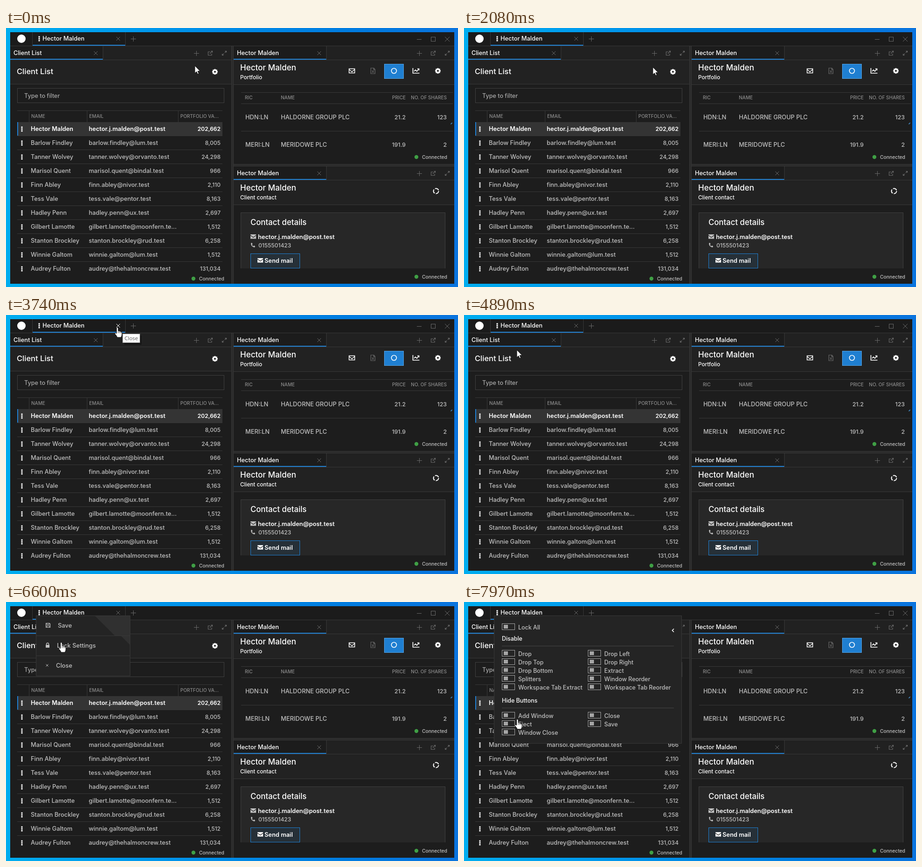
These frames come from a looping animation (967x556 px, 8000 ms). An HTML page with a canvas:

```html
<!DOCTYPE html>
<html lang="en">
<head>
<meta charset="utf-8">
<title>Client workspace</title>
<style>
html, body { margin: 0; width: 100%; height: 100%; overflow: hidden; background: #1d1d1d; }
canvas { display: block; }
</style>
</head>
<body>
<canvas id="stage" width="967" height="556"></canvas>
<script>
const g = document.getElementById('stage').getContext('2d');
const LOOP = 8000, STEP = 70;
const BLUE = '#1f7fd1', LINE = '#383838', DIM = '#686868', GREY = '#c0c0c0', WHITE = '#fff';
const CLIENT = 'Hector Malden', EMAIL = 'hector.j.malden@post.test';

const rows = [
  [CLIENT, EMAIL, '202,662'],
  ['Barlow Findley', 'barlow.findley@lum.test', '8,005'],
  ['Tanner Wolvey', 'tanner.wolvey@orvanto.test', '24,298'],
  ['Marisol Quent', 'marisol.quent@bindal.test', '966'],
  ['Finn Abley', 'finn.abley@nivor.test', '2,110'],
  ['Tess Vale', 'tess.vale@pentor.test', '8,163'],
  ['Hadley Penn', 'hadley.penn@ux.test', '2,697'],
  ['Gilbert Lamotte', 'gilbert.lamotte@moonfern.te...', '1,512'],
  ['Stanton Brockley', 'stanton.brockley@rud.test', '6,258'],
  ['Winnie Galtom', 'winnie.galtom@lum.test', '1,512'],
  ['Audrey Fulton', 'audrey@thehalmoncrew.test', '131,034']
];

// Pointer moves: [time, x, y] points along each path
const moves = [
  [[390, 404, 81], [950, 435, 54]],
  [[1940, 435, 54], [2220, 358, 109], [2640, 242, 73], [2780, 242, 53], [3200, 238, 26]],
  [[4400, 238, 26], [4680, 178, 109], [4890, 113, 75], [5240, 74, 41], [5450, 69, 24]],
  [[6110, 70, 24], [6600, 118, 86], [6810, 140, 93]],
  [[7550, 140, 93], [7970, 114, 251]]
];
const handTimes = [[810, 2010], [3060, 4470], [5380, 5650], [6320, 6950], [7830, 8000]];

const clamp = v => Math.max(0, Math.min(1, v));
const within = (t, a, b) => t >= a && t < b;

function box(x, y, w, h, color) {
  g.fillStyle = color;
  g.fillRect(x, y, w, h);
}
function frame(x, y, w, h, color) {
  g.strokeStyle = color;
  g.lineWidth = 1;
  g.strokeRect(x + .5, y + .5, w - 1, h - 1);
}
function path(d, x, y, color, width = 1, fill) {
  const p = new Path2D(d);
  g.save();
  g.translate(x, y);
  if (fill) { g.fillStyle = fill; g.fill(p); }
  if (color) { g.strokeStyle = color; g.lineWidth = width; g.stroke(p); }
  g.restore();
}
function text(s, x, y, { size = 12.8, color = GREY, weight = 500, align = 'left', family = 'Inter' } = {}) {
  g.font = `${weight} ${size}px ${family}, sans-serif`;
  g.textAlign = align;
  g.fillStyle = color;
  g.fillText(s, x, y);
}
function dot(x, y, r, color) {
  g.fillStyle = color;
  g.beginPath();
  g.arc(x, y, r, 0, 7);
  g.fill();
}
function ring(x, y, r, width, dash = []) {
  g.strokeStyle = WHITE;
  g.lineWidth = width;
  g.setLineDash(dash);
  g.beginPath();
  g.arc(x, y, r, 0, 2 * Math.PI);
  g.stroke();
  g.setLineDash([]);
}

const cross = (x, y, color = DIM, r = 4) => path(`M${-r} ${-r}L${r} ${r}M${r} ${-r}L${-r} ${r}`, x, y, color);
const plus = (x, y) => path('M-5.5 0H5.5M0-5.5V5.5', x + .5, y + .5, DIM);
const eject = (x, y, color = DIM) => path('M0-3H-4.5V4.5H3V1M-1 1L5-5M1.5-4.5H4.5V-1', x, y, color, 1.2);
const expand = (x, y) => path('M1-1L4-4M1.5-4.5H4.5V-1.5M-1 1L-4 4M-4.5 1.5V4.5H-1.5', x, y, DIM, 1.2);
const envelope = (x, y, color) => {
  path('M0 0H12V9.5H0Z', x, y, null, 1, color);
  path('M0 2L6 6.5L12 2', x, y, '#262626', 1.1);
};
function dots(x, y, gap = 4) {
  for (const i of [-1, 0, 1]) box(x - 1.5, y + i * gap - 1.5, 3, 3, WHITE);
}
function gear(x, y) {
  g.save();
  g.translate(x, y);
  for (let i = 0; i < 4; i++, g.rotate(Math.PI / 4)) box(-1.5, -6, 3, 12, WHITE);
  g.restore();
  dot(x, y, 4.6, WHITE);
  dot(x, y, 2, '#222');
}
function connected(x, y) {
  dot(x, y, 4.2, '#3f9f45');
  text('Connected', x + 12, y + 4, { size: 10.3 });
}

function paneTabs(x, y, right, title, hover) {
  box(x, y, right - x, 30, '#212121');
  box(x, y, 198, 29, '#1c1c1c');
  box(x, y + 29, right - x, 1, LINE);
  box(x + 198, y, 1, 29, LINE);
  box(x, y + 27, 198, 2, BLUE);
  text(title, x + 7, y + 19, { color: WHITE });
  cross(x + 183, y + 15);
  plus(right - 75, y + 15);
  eject(right - 45, y + 15, hover ? WHITE : DIM);
  expand(right - 15, y + 15);
}

function wallpaper() {
  const sky = g.createLinearGradient(0, 0, 967, 0);
  ['#00adef', '#009cee', '#008ae6', '#007ce0', '#0a74de'].forEach((c, i) => sky.addColorStop(i / 4, c));
  box(0, 0, 967, 556, sky);
}

function titleBar(closeHover) {
  box(9, 9, 950, 30, '#1b1b1b');
  box(9, 38, 950, 1, LINE);
  box(56, 9, 1, 29, LINE);
  box(255, 9, 1, 29, LINE);
  box(57, 36, 198, 2, BLUE);
  dot(33, 23, 9, WHITE);
  dots(71, 23);
  text(CLIENT, 78, 27, { color: WHITE });
  cross(240, 23, closeHover ? WHITE : DIM);
  plus(272, 23);
  path('M-5 0H5', 884, 24.5, DIM);
  frame(909, 19, 10, 10, DIM);
  cross(944, 24, DIM, 5);
}

function clientList(ejectHover) {
  paneTabs(9, 39, 482, 'Client List', ejectHover);
  box(9, 69, 473, 51, '#222');
  box(9, 120, 473, 1, LINE);
  text('Client List', 23, 99, { size: 16.5, color: WHITE });
  gear(447, 94);
  frame(24, 129, 443, 32, '#404040');
  text('Type to filter', 39, 150, { color: '#a8a8a8', size: 12.6 });

  box(24, 177, 439, 1, LINE);
  for (const x of [49, 173, 368]) box(x, 178, 1, 24, LINE);
  const head = { size: 10, color: '#8c8c8c' };
  text('NAME', 54, 193, head);
  text('EMAIL', 178, 193, head);
  text('PORTFOLIO VA...', 373, 193, head);

  g.save();
  g.beginPath();
  g.rect(9, 178, 473, 346);
  g.clip();
  rows.forEach(([name, mail, value], i) => {
    const y = 202 + 30 * i, style = i ? {} : { color: WHITE, weight: 600 };
    if (!i) {
      box(24, y, 439, 29, '#343434');
      box(24, y, 2, 29, BLUE);
    }
    box(24, y + 29, 439, 1, LINE);
    dots(34, y + 15);
    text(name, 53, y + 19, style);
    text(mail, 177, y + 19, style);
    text(value, 459, y + 19, { ...style, size: 12, align: 'right' });
  });
  g.restore();
  connected(401, 538);
}

function paneHeader(y, h, subtitle) {
  box(487, y, 472, h, '#222');
  box(487, y + h, 472, 1, LINE);
  text(CLIENT, 501, y + 22, { size: 17, color: WHITE });
  text(subtitle, 501, y + 41, { size: 11.7, color: WHITE });
}

function portfolio() {
  paneTabs(487, 39, 959, CLIENT);
  paneHeader(69, 52, 'Portfolio');
  path('M-6-4.5H6V4.5H-6ZM-6-3L0 2L6-3', 740, 92, WHITE, 1.5);
  path('M-4.5-6H2L4.5-3V6H-4.5ZM1.5-6V-2.5H4.5M-2-1L2 4M2-1L-2 4', 785, 92, DIM, 1.2);
  box(809, 77, 42, 32, BLUE);
  frame(809, 77, 42, 32, '#55a5e4');
  ring(830, 92, 5.5, 1.6);
  path('M-6.5-6V5H7.5M-4 1L-1-2L2 1L6-4M3-4.5H6.5V-1', 877, 92, WHITE, 1.7);
  gear(924, 92);

  for (const y of [138, 162, 221]) box(503, y, 453, 1, LINE);
  const head = { size: 10, color: '#8c8c8c' }, headRight = { ...head, align: 'right' };
  text('RIC', 511, 153, head);
  text('NAME', 588, 153, head);
  text('PRICE', 855, 153, headRight);
  text('NO. OF SHARES', 943, 153, headRight);
  [['HDN:LN', 'HALDORNE GROUP PLC', '21.2', '123'], ['MERI:LN', 'MERIDOWE PLC', '191.9', '2']].forEach((r, i) => {
    const y = 196 + 59 * i, num = { size: 12.3, align: 'right' };
    text(r[0], 512, y);
    text(r[1], 588, y);
    text(r[2], 855, y, num);
    text(r[3], 943, y, num);
  });
  path('M-1.5 1.5L1.5-1.5', 953, 205, '#4b9be0', 1.4);
  connected(878, 277);
}

function contact() {
  box(487, 292, 472, 5, '#2a2a2a');
  box(487, 292, 472, 1, LINE);
  box(487, 296, 472, 1, LINE);
  paneTabs(487, 297, 959, CLIENT);
  paneHeader(327, 52, 'Client contact');
  ring(920, 350, 5.5, 2, [9, 2.5]);

  g.save();
  g.beginPath();
  g.rect(487, 380, 472, 136);
  g.clip();
  box(502, 396, 438, 130, '#272727');
  frame(502, 396, 438, 130, '#404040');
  text('Contact details', 523, 423, { size: 16.7, color: WHITE });
  envelope(523, 443, GREY);
  text(EMAIL, 539, 453, { color: WHITE, weight: 600 });
  path('M-4-4L-2-5L-.5-2L-2-.5Q-1 1.5 1 2.5L2.5 1L5 2.5L4 5Q-4 4-4-4Z', 528, 466, null, 1, GREY);
  text('0155501423', 540, 471, { size: 12 });
  box(523, 484, 106, 32, '#263038');
  frame(523, 484, 106, 32, BLUE);
  envelope(538, 494, WHITE);
  text('Send mail', 553, 504, { color: WHITE, weight: 600 });
  g.restore();
  connected(878, 534);
}

// Diagonal hover light entering a menu item from its top right corner
function sweep(item, amount) {
  const top = 30 + 43 * item, x = 266 - 244 * clamp(amount) ** 2;
  g.save();
  g.beginPath();
  g.rect(65, top, 200, 42);
  g.clip();
  path(`M${x} 0H320V42H${x + 42}Z`, 0, top, null, 1, '#303030');
  g.restore();
}

function menu(t) {
  box(64, 29, 202, 130, '#242424');
  sweep(0, Math.min(t - 6390, 6740 - t) / 250);
  sweep(1, (t - 6530) / 250);
  frame(64, 29, 202, 130, LINE);
  box(65, 72, 200, 1, LINE);
  box(65, 115, 200, 1, LINE);
  path('M-4.5-4.5H3L4.5-3V4.5H-4.5ZM-2.5-4.5V-1.5H2V-4.5M-2.5 4.5V1H2.5V4.5', 90, 50, GREY, 1.2);
  path('M-4-1H4V5H-4Z', 89, 93, null, 1, GREY);
  path('M-2.5-1V-2.5A2.5 2.5 0 0 1 2.5-2.5V-1', 89, 93, GREY, 1.4);
  cross(88, 136, GREY, 2.5);
  text('Save', 111, 55);
  text('Lock Settings', 109, 98);
  text('Close', 107, 141, { color: t < 6250 ? '#c3d8ea' : GREY });
}

function toggle(label, x, y) {
  frame(x, y - 7, 28, 14, '#a5a5a5');
  box(x + 4, y - 4, 9, 8, '#a5a5a5');
  text(label, x + 35, y + 6, { size: 12.4 });
}

function settings(grow) {
  const w = 202 + 200 * grow, h = 130 + 145 * grow;
  g.save();
  g.beginPath();
  g.rect(64, 29, w, h);
  g.clip();
  box(64, 29, w, h, '#242424');
  frame(64, 29, w, h, LINE);
  toggle('Lock All', 81, 53);
  path('M2-3.5L-1.5 0L2 3.5', 447, 61, WHITE, 1.6);
  const section = (title, y, left, right) => {
    text(title, 81, y, { color: WHITE, size: 12.4 });
    box(81, y + 11, 368, 1, '#454545');
    left.forEach((s, i) => toggle(s, 81, y + 27 + 18 * i));
    right.forEach((s, i) => toggle(s, 265, y + 27 + 18 * i));
  };
  section('Disable', 83,
    ['Drop', 'Drop Top', 'Drop Bottom', 'Splitters', 'Workspace Tab Extract'],
    ['Drop Left', 'Drop Right', 'Extract', 'Window Reorder', 'Workspace Tab Reorder']);
  section('Hide Buttons', 216, ['Add Window', 'Eject', 'Window Close'], ['Close', 'Save']);
  g.restore();
}

function tooltip(label, x, y) {
  box(x + 4, y + 4, 37, 20, 'rgba(0,0,0,.35)');
  box(x, y, 38, 20, WHITE);
  frame(x, y, 38, 20, '#767676');
  text(label, x + 19, y + 14, { size: 11.5, weight: 400, color: '#575757', align: 'center', family: 'Open Sans' });
}

function spline(a, b, c, d, u) {
  return b + .5 * u * (c - a + u * (2 * a - 5 * b + 4 * c - d + u * (3 * (b - c) + d - a)));
}
function pointer(t) {
  const pts = moves.findLast(m => t >= m[0][0] + STEP) || moves[0];
  const start = pts[0][0], last = pts.length - 1;
  const q = Math.max(start, Math.min(start + Math.floor((t - start) / STEP) * STEP, pts[last][0]));
  let i = 0;
  while (i < last - 1 && q >= pts[i + 1][0]) i++;
  const [a, b, c, d] = [i - 1, i, i + 1, i + 2].map(k => pts[Math.max(0, Math.min(last, k))]);
  const u = (q - b[0]) / (c[0] - b[0]);
  return [1, 2].map(k => Math.round(spline(a[k], b[k], c[k], d[k], u)));
}
function drawPointer(t) {
  const [x, y] = pointer(t);
  if (handTimes.some(([a, b]) => within(t, a, b))) {
    path('M-1.5 2Q.2-1 2 2V8.5Q4 7 5 9.3Q7 8 7.8 10.3Q10 9.3 10 12V16Q10 19 8 22H0Q-1.5 18-5 14.5Q-5 11-1.5 13.5Z',
      x, y, '#111', 1, WHITE);
    path('M2 9V13M5 9.5V13M7.8 10.5V13', x, y, '#111', .8);
  } else {
    path('M0 0V16L3.7 12.7L6 18L8.5 17L6.2 11.7H11.3Z', x, y, '#111', 1, WHITE);
  }
}

function draw(t) {
  wallpaper();
  box(9, 9, 950, 540, '#1d1d1d');
  titleBar(within(t, 3060, 4470));
  clientList(within(t, 810, 2010));
  box(482, 39, 5, 510, '#2a2a2a');
  box(482, 39, 1, 510, LINE);
  box(486, 39, 1, 510, LINE);
  portfolio();
  contact();
  if (t >= 6950) settings(clamp((Math.floor((t - 6950) / STEP) + 1) / 3));
  else if (t >= 5650) menu(t);
  if (within(t, 1480, 2010)) tooltip('Eject', 444, 68);
  if (within(t, 3740, 4470)) tooltip('Close', 249, 40);
  drawPointer(t);
}

function tick() {
  draw(performance.now() % LOOP);
  requestAnimationFrame(tick);
}
tick();
</script>
</body>
</html>
```
